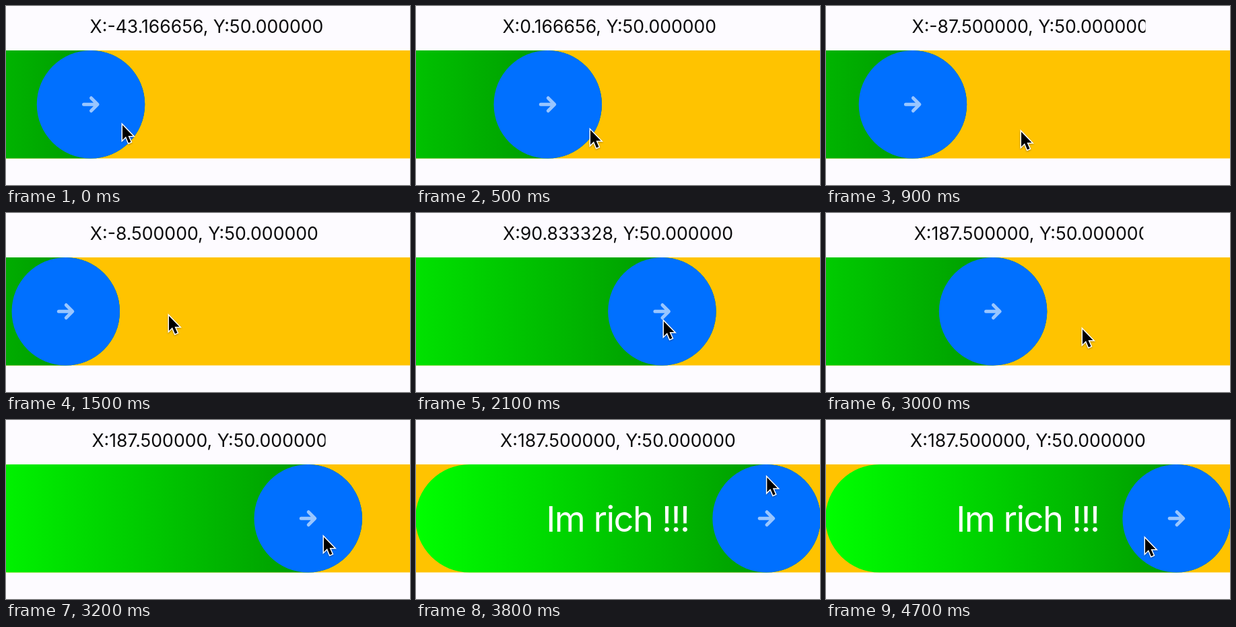
An HTML page for the animation above (4.8 s loop, 600 by 266 pixels).

```html
<!DOCTYPE html>
<html lang="en">
<head>
<meta charset="utf-8">
<title>Swipe button</title>
<style>
  html, body { margin: 0; width: 100%; height: 100%; overflow: hidden; background: #fdfbff; }
  svg { display: block; width: 600px; height: 266px; }
  text { font-family: Inter, "Liberation Sans", sans-serif; }
  #label { font-size: 26.6px; fill: #0c0c0e; }
  #message { font-size: 52.5px; letter-spacing: -1.5px; fill: #fff; }
  #cursor { filter: drop-shadow(0 1px 1px #0005); }
</style>
</head>
<body>
<svg viewBox="0 0 600 266">
  <defs>
    <linearGradient id="green">
      <stop stop-color="#00ff00"/>
      <stop offset="1" stop-color="#008c00"/>
    </linearGradient>
    <clipPath id="labelBox"><rect id="labelRect" y="10" height="44"/></clipPath>
  </defs>
  <g clip-path="url(#labelBox)"><text id="label" y="40"></text></g>
  <rect y="66" width="600" height="160.5" fill="#ffc300"/>
  <g id="slider">
    <rect x="-521.5" y="-80.25" width="601.75" height="160.5" rx="80.25" fill="url(#green)"/>
    <circle r="80.25" fill="#0070ff"/>
    <path d="M-10.5 0H9.5M.5-9.5L10 0L.5 9.5" fill="none" stroke="#99c6ff" stroke-width="5" stroke-linecap="round" stroke-linejoin="round"/>
  </g>
  <text id="message" x="299.5" y="166" text-anchor="middle">Im rich !!!</text>
  <path id="cursor" d="M1 3V25L6 20L10 29.5L13.5 28L9.5 19H16.5Z" stroke="#fff" stroke-width="3" paint-order="stroke"/>
</svg>
<script>
const LOOP = 4800, STEP = 100;
const WIDTH = 375, REST = 100, SCALE = 1.605;
const EASE_MS = 350, SAMPLES = 35;
const el = id => document.getElementById(id);
const label = el('label');

// Pull from rest to a reach, hold, then let go to a final position
const drags = [
  { grab: -510, reach: 680, to: 203.444, release: 680, end: REST, power: 1 },
  { grab: 1400, reach: 1794, to: 278.3333, release: 2200, end: REST, power: 2 },
  { grab: 2600, reach: 3000, to: 287, release: 3000, end: WIDTH, power: 1 }
];
// time, x, y
const pointer = [
  [0, 172, 174], [680, 289, 184], [900, 289, 184], [1200, 138, 150],
  [1400, 138, 150], [1500, 241, 150], [1800, 367, 158], [2200, 367, 158],
  [2500, 106, 166], [2600, 106, 166], [3000, 380, 170], [3200, 471, 171],
  [4100, 545, 38], [4600, 455, 181], [4700, 473, 173]
];

const smooth = u => u * u * (3 - 2 * u);

// Eases every change of a value over the last EASE_MS
function eased(value, t) {
  let sum = 0;
  for (let k = 0; k < SAMPLES; k++) {
    const weight = smooth((k + 1) / SAMPLES) - smooth(k / SAMPLES);
    sum += weight * value(t - (k + .5) * EASE_MS / SAMPLES);
  }
  return sum;
}

function dragged(t) {
  const d = drags.findLast(d => t >= d.grab);
  if (!d) return REST;
  if (t >= d.release) return d.end;
  const u = Math.min(1, (t - d.grab) / (d.reach - d.grab));
  return REST + (d.to - REST) * (1 - (1 - u) ** d.power);
}

function caption(t) {
  const x = Math.round(dragged(t) * 3) / 3 - WIDTH / 2;
  const shown = Math.trunc(x * 65536) / 65536;
  return `X:${shown.toFixed(6)}, Y:50.000000`;
}

const pen = document.createElement('canvas').getContext('2d');
pen.font = '26.6px Inter, "Liberation Sans", sans-serif';
const captionWidth = t => pen.measureText(caption(t)).width;

function drawLabel(t) {
  const box = eased(captionWidth, t), left = 300 - box / 2;
  label.textContent = caption(t);
  label.setAttribute('x', left);
  el('labelRect').setAttribute('x', left - 2);
  el('labelRect').setAttribute('width', box + 4);
}

function pointerAt(t) {
  const i = pointer.findIndex(p => p[0] > t);
  if (i < 0) return pointer.at(-1).slice(1);
  const a = pointer[i - 1], b = pointer[i];
  const u = (t - a[0]) / (b[0] - a[0]);
  return [1, 2].map(k => a[k] + (b[k] - a[k]) * u);
}

const place = (id, x, y) => el(id).setAttribute('transform', `translate(${x} ${y})`);

function draw(t) {
  place('slider', eased(dragged, t) * SCALE - 81.25, 146.25);
  place('cursor', ...pointerAt(t));
  el('message').setAttribute('opacity', eased(s => +(s >= 3350), t));
  drawLabel(t);
}

const start = performance.now();
let last = 0;
function tick() {
  const t = Math.floor((performance.now() - start) % LOOP / STEP) * STEP;
  if (t !== last) draw(last = t);
  requestAnimationFrame(tick);
}
draw(0);
requestAnimationFrame(tick);
</script>
</body>
</html>
```
